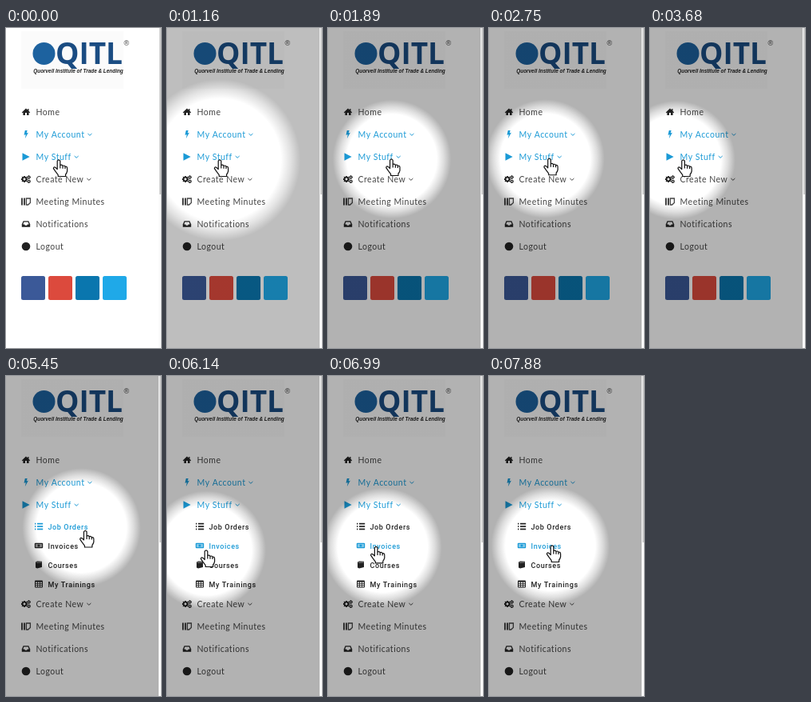
Write an HTML page with a canvas that moves like this. It is 194 by 400 pixels and loops after 8000 ms.

```html
<!DOCTYPE html>
<html lang="en">
<head>
<meta charset="utf-8">
<title>Side menu</title>
<style>
  html, body { margin: 0; width: 100%; height: 100%; overflow: hidden; background: #fff; }
  canvas { display: block; width: 194px; height: 400px; }
</style>
</head>
<body>
<canvas id="stage"></canvas>
<script>
const W = 194, H = 400, LOOP = 8000, PANEL = 191;
const STEP = 131.5, PHASE = 108, LAG = 60;
const BLUE = '#1b9ad6', INK = '#444', DARK = '#222';
const canvas = document.getElementById('stage');
const ctx = canvas.getContext('2d');
const ratio = window.devicePixelRatio || 1;
canvas.width = W * ratio;
canvas.height = H * ratio;

// Turning points of the pointer: [time, x, y]
const turns = [
  [1500, 66, 165], [1770, 80, 164], [2330, 44, 165], [2860, 80, 163], [3520, 28, 165],
  [3930, 81, 165], [4300, 66, 165], [5000, 66, 165], [5430, 101, 195], [6010, 49, 218],
  [6290, 49, 218], [6680, 84, 215], [7200, 38, 212], [7500, 38, 212], [7860, 79, 212]
];

const progress = (t, start, length) => Math.min(1, Math.max(0, (t - start) / length));
const easeOut = (p, power) => 1 - (1 - p) ** power;
const mix = (a, b, p) => a + (b - a) * p;

function pointer(t) {
  const i = Math.max(1, turns.findIndex(k => k[0] > t));
  const [a, b] = t >= turns.at(-1)[0] ? turns.slice(-2) : [turns[i - 1], turns[i]];
  const p = (1 - Math.cos(Math.PI * progress(t, a[0], b[0] - a[0]))) / 2;
  return [mix(a[1], b[1], p), mix(a[2], b[2], p)];
}

function text(str, x, y, font, color, spacing = 0, align = 'left') {
  ctx.font = font;
  ctx.fillStyle = color;
  ctx.textAlign = align;
  ctx.letterSpacing = spacing + 'px';
  ctx.fillText(str, x, y);
  return ctx.measureText(str).width;
}

function rect(x, y, w, h, color) {
  ctx.fillStyle = color;
  ctx.fillRect(x, y, w, h);
}

function roundRect(x, y, w, h, r, color) {
  ctx.fillStyle = color;
  ctx.beginPath();
  ctx.roundRect(x, y, w, h, r);
  ctx.fill();
}

function disc(x, y, r, color) {
  ctx.fillStyle = color;
  ctx.beginPath();
  ctx.arc(x, y, r, 0, Math.PI * 2);
  ctx.fill();
}

function shape(d, color) {
  ctx.fillStyle = color;
  ctx.fill(new Path2D(d));
}

function line(d, color, width) {
  ctx.strokeStyle = color;
  ctx.lineWidth = width;
  ctx.stroke(new Path2D(d));
}

function at(x, y, paint) {
  ctx.save();
  ctx.translate(x, y);
  paint();
  ctx.restore();
}

function gear(x, y, r) {
  disc(x, y, r * 0.78, DARK);
  ctx.strokeStyle = DARK;
  ctx.lineWidth = r * 0.45;
  ctx.beginPath();
  for (let a = 0; a < 6; a += Math.PI / 4) {
    ctx.moveTo(x, y);
    ctx.lineTo(x + r * Math.cos(a), y + r * Math.sin(a));
  }
  ctx.stroke();
  disc(x, y, r * 0.36, '#fff');
}

// Icons are drawn around their own centre
const icons = {
  home: () => shape('M-5.2 .4L0-4.4 2.2-2.4V-4H3.5V-1.2L5.2 .4 4.5 1.2 3.6 .4V4H1V1H-1V4H-3.6V.4L-4.5 1.2Z', DARK),
  bolt: c => shape('M-1.2-5H1.7L.7-1.8 2.9-2.3-1.2 5.3-.2.2-2.5.7Z', c),
  play: c => shape('M-4.5-4.8L4.7 0-4.5 4.8Z', c),
  cogs: () => { gear(-2, 0, 4); gear(3.6, -2.5, 2.3); gear(3.6, 2.7, 2.3); },
  minutes: () => {
    for (const x of [-6, -3]) rect(x, -4.5, 2, 9, INK);
    line('M.4-4H5.4V1.4L2.6 4H.4Z', INK, 1.3);
  },
  inbox: () => {
    shape('M-3.4-3.8H3.4L5.2.6V3.8H-5.2V.6Z', DARK);
    shape('M-2.6-2.5H2.6L3.7.6H1.8L1.2 1.8H-1.2L-1.8.6H-3.7Z', '#fff');
  },
  dot: () => disc(0, 0, 5.3, DARK),
  list: c => {
    for (const y of [-4.2, -0.8, 2.6]) {
      rect(-5, y, 1.4, 1.7, c);
      rect(-2, y, 7.2, 1.7, c);
    }
  },
  note: c => {
    roundRect(-5.2, -3.2, 10.4, 6.4, 1, c);
    rect(-4, -2, 8, 4, 'rgba(255,255,255,.45)');
    disc(0, 0, 1.5, c);
  },
  book: c => {
    shape('M-2-4.6L4-4.2V3L-2 4.6-4 3.6V-3.4Z', c);
    line('M-3.4-3.4L-2-2.8 3.6-3.2', '#ccc', 0.6);
  },
  table: c => {
    roundRect(-5, -4.5, 10, 9, 1, c);
    for (let i = 0; i < 9; i++) rect(-4 + (i % 3) * 2.9, -2.4 + (i / 3 | 0) * 2.2, 2.1, 1.4, '#fff');
  }
};

const menu = [
  { label: 'Home', icon: 'home' },
  { label: 'My Account', icon: 'bolt', color: BLUE, chevron: true },
  { label: 'My Stuff', icon: 'play', color: BLUE, chevron: true },
  { label: 'Create New', icon: 'cogs', chevron: true },
  { label: 'Meeting Minutes', icon: 'minutes' },
  { label: 'Notifications', icon: 'inbox' },
  { label: 'Logout', icon: 'dot' }
];
const submenu = [
  { label: 'Job Orders', icon: 'list' },
  { label: 'Invoices', icon: 'note' },
  { label: 'Courses', icon: 'book' },
  { label: 'My Trainings', icon: 'table' }
];
const tiles = ['#3b5998', '#dc4a3d', '#0a76ae', '#1fa9e8'];

function drawHeader() {
  rect(19, 4, 128, 72, '#fbfbfb');
  disc(47.5, 32, 14, '#1d629f');
  text('QITL', 62, 44.5, '700 37px "Open Sans", sans-serif', '#1a4c82');
  text('®', 147.5, 22, '9px "Liberation Sans", Arial, sans-serif', '#333');
  text('Quorvell Institute of Trade & Lending', 90.5, 56,
    'italic 700 6.4px "Liberation Sans", Arial, sans-serif', '#222', 0, 'center');
}

function drawMenu(open) {
  menu.forEach(({ label, icon, color = INK, chevron }, i) => {
    const y = 105 + i * 28 + (i > 2 ? open : 0);
    at(25, y, () => icons[icon](color));
    const width = text(label, 37.5, y + 4, '10.5px Lato, sans-serif', color, 0.5);
    if (chevron) at(44 + width, y, () => line('M-2.5-1L0 1.3 2.5-1', color, 1));
  });
  tiles.forEach((color, i) => roundRect(19 + i * 34, 310 + open, 30, 30, 2.5, color));
}

function drawSubmenu(open, pointerY) {
  ctx.save();
  ctx.beginPath();
  ctx.rect(0, 175, PANEL, open);
  ctx.clip();
  submenu.forEach(({ label, icon }, i) => {
    const y = 188 + i * 24;
    const color = Math.abs(pointerY - y) < 12 ? BLUE : DARK;
    at(41, y, () => icons[icon](color));
    text(label, 52.5, y + 3.5, '500 9px Roboto, sans-serif', color, 0.6);
  });
  ctx.restore();
}

function drawShade(x, y, fade) {
  const dark = 0.3 * fade, radius = 72 + 178 * (1 - fade);
  const g = ctx.createRadialGradient(x, y, radius * 0.78, x, y, radius * 1.03);
  g.addColorStop(0, 'rgba(0,0,0,0)');
  g.addColorStop(0.5, `rgba(0,0,0,${dark * 0.45})`);
  g.addColorStop(1, `rgba(0,0,0,${dark})`);
  rect(0, 0, PANEL, H, g);
}

function drawHand() {
  const outline = 'M-1.8 11.5V1.2Q0-1.4 1.8 1.2V6.6Q4 5.2 5 7.4 7 6.2 8 8.4' +
    'Q10.6 7.6 10.6 10.4V14Q10 16.5 8.6 18V20.5H-.8V18.6L-4 14.4-6.6 10.6Q-6.4 8-4 9.4Z';
  ctx.lineJoin = 'round';
  shape(outline, '#fff');
  line(outline + 'M1.8 6.6V10.5M5 7.6V10.7M8 8.6V11', '#111', 1.2);
}

function draw(now) {
  const t = Math.floor((now % LOOP - PHASE) / STEP) * STEP + PHASE;
  const [x, y] = pointer(t);
  const fade = easeOut(progress(t, 950, 340), 2);
  const open = 96 * easeOut(progress(t, 4605, 370), 4);

  ctx.setTransform(ratio, 0, 0, ratio, 0, 0);
  rect(0, 0, W, H, '#fff');
  drawHeader();
  drawMenu(open);
  drawSubmenu(open, y);
  drawShade(...pointer(t - LAG), fade);
  rect(PANEL, 0, 3, H, '#fafafa');
  rect(PANEL + 1, 0, 2, 208, '#cdcdcd');
  at(x, y, drawHand);
}

const start = performance.now();
function frame() {
  draw(performance.now() - start);
  requestAnimationFrame(frame);
}
frame();
</script>
</body>
</html>
```
